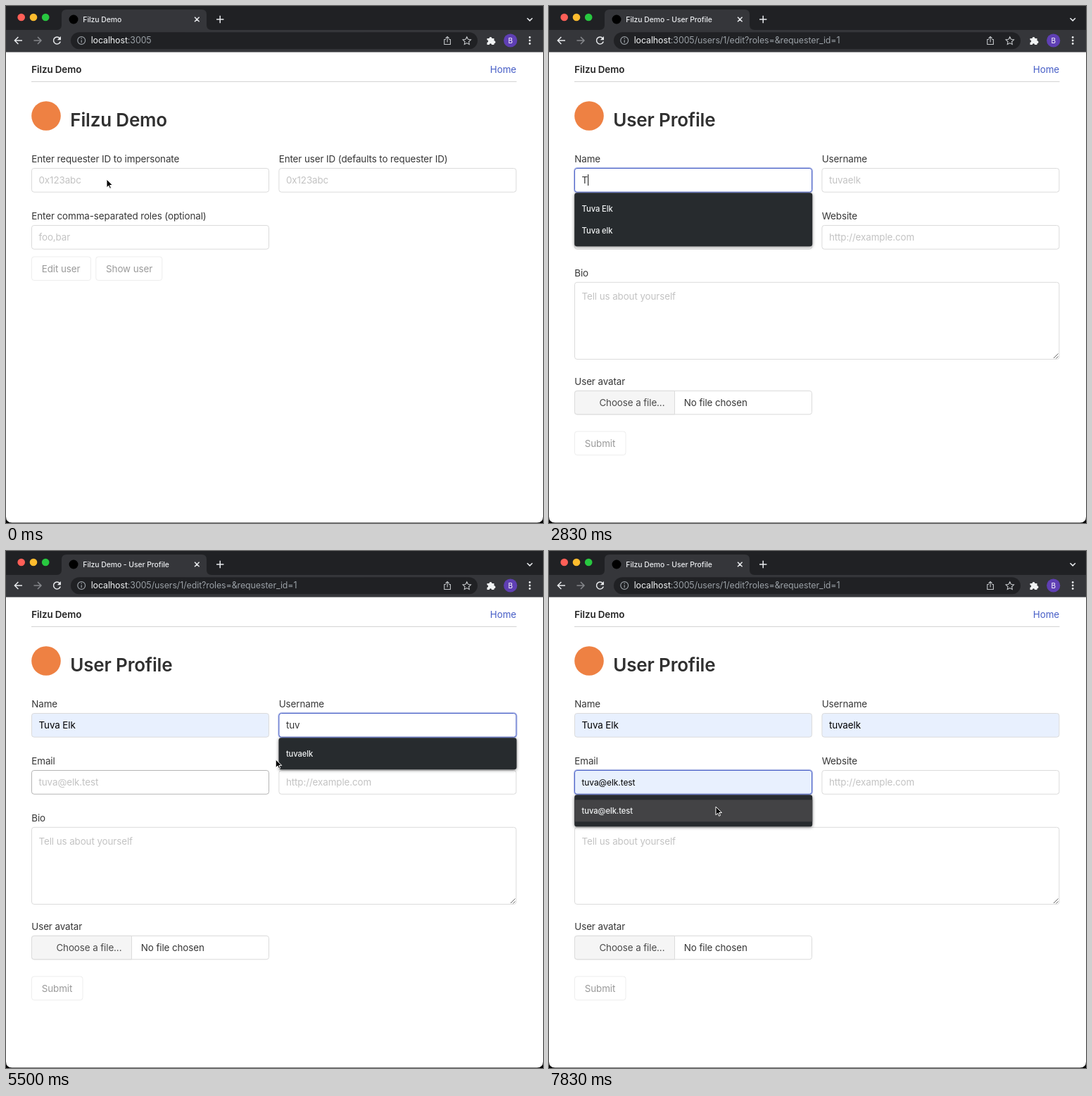
An HTML page for the animation above (8 s loop, 763 by 734 pixels).

```html
<!DOCTYPE html>
<html lang="en">
<head>
<meta charset="utf-8">
<title>Filzu Demo</title>
<style>
  html, body { margin: 0; width: 100%; height: 100%; overflow: hidden; background: #000; }
  svg { display: block; }
  text { font-family: Inter, Roboto, sans-serif; letter-spacing: -.007em; white-space: pre; }
  .popup { filter: drop-shadow(0 1px 2px rgba(0, 0, 0, .5)); }
</style>
</head>
<body>
<svg id="stage" width="763" height="734" viewBox="0 0 763 734"></svg>
<script>
const LOOP = 8000, SIZE = 13.4;
const INK = '#363636', LINK = '#485fc7', TEAL = '#00d1b2', LINE = '#dbdbdb', HOVER = '#b5b5b5';
const NAME = 'Tuva Elk', USER = 'tuvaelk', MAIL = 'tuva@elk.test';
const OPEN_PAGE = 1610, TYPED = 0, FILLED = 1, PREVIEW = 2;

// Each timeline holds [start, value, ...] entries; the latest started one applies.
const focus = [[0, ''], [120, 'id'], [1100, 'edit'], [OPEN_PAGE, ''], [2060, 'name'], [4170, 'user'], [6060, 'email']];
const typing = (start, gap, word) => [...word].map((_, i) => [start + i * gap, word.slice(0, i + 1), TYPED]);
const values = {
  id: [[0, ''], [400, '1', TYPED]],
  name: [[0, ''], ...typing(2780, 170, 'Tuv'), [3390, NAME, PREVIEW], [3940, NAME, FILLED]],
  user: [[0, ''], ...typing(4670, 160, 'tuv'), [5560, USER, PREVIEW], [5830, USER, FILLED]],
  email: [[0, ''], ...typing(7000, 85, 'tuv'), [7745, MAIL, PREVIEW]]
};
const popups = [
  [0, null],
  [2780, [NAME, 'Tuva elk']], [3940, null],
  [4670, [USER]], [5830, null],
  [6890, ['asd', 'brolkasundet@mail.test', MAIL, 'ads', 'dsa', 'is']], [7000, [MAIL]]
];
const pointer = [
  [0, 143, 246, 'arrow'], [60, 143, 246, 'beam'], [120, 144, 248, 'beam'], [400, 144, 248, ''],
  [610, 142, 256, 'beam'], [650, 138, 275, 'arrow'], [690, 130, 315, 'beam'], [735, 119, 347, 'arrow'],
  [780, 114.5, 358, 'hand'], [830, 114.5, 358, 'hand'], [960, 104, 366, 'hand'], [OPEN_PAGE, 104, 366, 'hand'],
  [1660, 106, 362, 'arrow'], [1960, 157, 256, 'beam'], [2060, 160, 249, 'beam'], [2780, 160, 249, ''],
  [3330, 160, 252, 'beam'], [3390, 160, 268, 'arrow'], [3560, 159, 282, 'hand'], [3720, 159, 285.5, 'hand'], [4170, 159, 285.5, ''],
  [5050, 161, 288, 'arrow'], [5440, 383, 296, 'arrow'], [5500, 383, 296, 'arrow'], [5560, 396, 293, 'arrow'],
  [5670, 430, 284, 'hand'], [6060, 430, 284, ''],
  [7500, 229, 332, 'beam'], [7670, 229, 332, 'beam'], [7720, 231, 342, 'arrow'], [7830, 237, 363, 'arrow']
];
const shapes = {
  arrow: '<path d="M0 0v11.8l2.8-2.6 1.8 4.1 1.9-.9-1.8-3.9h3.8z" fill="#000" stroke="#fff"/>',
  hand: '<path d="M-1 1c0-1.3 2-1.3 2 0v4c.3-.9 1.9-.8 2 .2c.4-.7 1.8-.5 1.9 .5c.5-.6 1.7-.2 1.7 .8v3.5c0 2-1 2.6-1.2 4.5h-5.4c-.4-1.8-2.6-3.2-3.6-5.2c-.5-1.2 1-2 2-.9l.6 .8zM1.200 9.500v3M3 9.500v3M4.800 9.500v3" fill="#fff" stroke="#000"/>',
  beam: '<path d="M-3-7q3 0 3 2q0-2 3-2M0-5V5M-3 7q3 0 3-2q0 2 3 2" fill="none" stroke="#222"/>'
};

const at = (list, t) => list.findLast(e => e[0] <= t);
const pen = document.createElement('canvas').getContext('2d');
function widthOf(s) {
  pen.font = `${SIZE}px Inter, Roboto, sans-serif`;
  return pen.measureText(s).width;
}

const text = (x, y, s, fill = INK, size = SIZE, weight = 400, more = '') =>
  `<text x="${x}" y="${y}" fill="${fill}" font-size="${size}" font-weight="${weight}" ${more}>${s}</text>`;
const box = (x, y, w, h, fill, stroke = 'none', r = 3.4) =>
  `<rect x="${x}" y="${y}" width="${w}" height="${h}" rx="${r}" fill="${fill}" stroke="${stroke}"/>`;
const ring = (x, y, w, h, color) =>
  `<rect x="${x}" y="${y}" width="${w}" height="${h}" rx="4" fill="none" stroke="${color}" stroke-opacity=".35" stroke-width="3"/>`;
const dot = (x, y, r, fill) => `<circle cx="${x}" cy="${y}" r="${r}" fill="${fill}"/>`;
const line = (d, stroke = '#e8eaed', w = 1.5) => `<path d="${d}" fill="none" stroke="${stroke}" stroke-width="${w}"/>`;

function button(x, y, w, label, on, focused) {
  const body = on ? box(x, y, w, 34.5, TEAL) : box(x + .5, y + .5, w - 1, 33.5, '#fff', '#ededed');
  return (focused ? ring(x, y, w, 34.5, TEAL) : '') + body
    + text(x + 14.8, y + 22.4, label, on ? '#fff' : '#9a9a9a');
}

function field(t, x, y, label, hint, id, hover) {
  const [since, focused] = at(focus, t);
  const active = id && focused === id;
  const [changed, value, mode] = id ? at(values[id], t) : [0, ''];
  let s = text(x + .3, y - 8, label);
  if (active) s += ring(x + .3, y + .3, 337.4, 34.1, LINK);
  s += box(x + .5, y + .5, 337, 33.7, mode ? '#e8f0fe' : '#fff', active ? LINK : hover ? HOVER : LINE);
  if (value) s += text(x + 10.5, y + 22, value, mode ? '#000' : INK, mode === PREVIEW ? 12 : SIZE);
  else s += text(x + 10.5, y + 22, hint, '#c3c3c3');
  const blinkOn = (t - Math.max(since, changed)) % 1000 < 500;
  if (active && mode !== PREVIEW && blinkOn)
    s += box(x + 10.5 + widthOf(value), y + 9, 1, 16, '#111', 'none', 0);
  return s;
}

function popup(t) {
  const items = at(popups, t)[1];
  if (!items) return '';
  const id = at(focus, t)[1];
  const x = id === 'user' ? 387.5 : 36.2, y = id === 'email' ? 346.3 : 265.2;
  let s = box(x, y, 338, 14 + items.length * 31, '#272b2e');
  if (at(values[id], t)[2] === PREVIEW) s += box(x, y + 7, 338, 31, '#434345', 'none', 0);
  items.forEach((item, i) => s += text(x + 10.4, y + 26.3 + i * 31, item, '#f1f3f4', 11.2, 500));
  return `<g class="popup">${s}</g>`;
}

function browser(t) {
  const edit = t >= OPEN_PAGE;
  const rest = ':3005' + (edit ? '/users/1/edit?roles=&amp;requester_id=1' : '');
  return box(0, 0, 763, 80, '#202124', 'none', 0)
    + box(0, 34, 763, 31.5, '#35363a', 'none', 0)
    + dot(21.7, 16, 5.3, '#ff5f57') + dot(39, 16, 5.3, '#febc2e') + dot(56.2, 16, 5.3, '#28c840')
    + '<path d="M72 34q7 0 7-7V12q0-7 7-7H278q7 0 7 7V27q0 7 7 7z" fill="#35363a"/>'
    + dot(96, 19, 6.5, '#000')
    + text(109.3, 22.8, 'Filzu Demo' + (edit ? ' - User Profile' : ''), '#e8eaed', 10.45, 500)
    + line('M268 15.7l6.6 6.6m0-6.6l-6.6 6.6M299 19h10.4M304.2 13.8v10.4M740.5 17.2l3.7 3.7 3.7-3.7')
    + line('M23 49H12.5M17.4 44l-5 5 5 5')
    + line('M39.5 49H50M45 44l5 5-5 5', '#85878b')
    + line('M76.4 45.8A5 5 0 1 0 77.3 50.5')
    + '<path d="M78 43v5.2h-5.2z" fill="#e8eaed"/>'
    + box(92, 37.3, 578, 24, '#202124', 'none', 12)
    + line('M101.8 49a5.4 5.4 0 1 0 10.8 0a5.4 5.4 0 1 0-10.8 0M107.2 48.3v3.7M107.2 45.6v1.4', '#9aa0a6', 1.2)
    + text(120.7, 53.3, `localhost<tspan fill="#9aa0a6">${rest}</tspan>`, '#f1f3f4', 12.4)
    + line('M625 47.5h-2.2v7h8.6v-7h-2.2M627.1 51.5V43.7M624.6 46l2.5-2.4 2.5 2.4', '#c4c7ca', 1.1)
    + line('M654.8 43.7l1.7 3.6 4 .5-2.9 2.7 .7 4-3.5-1.9-3.5 1.9 .7-4-2.9-2.7 4-.5z', '#c4c7ca', 1.1)
    + '<path d="M683.5 46h3a2 2 0 1 1 4 0h3v3.2a2 2 0 1 1 0 4V55h-3.4a1.7 1.7 0 1 0-3.4 0h-3.2v-3.3a1.7 1.7 0 1 0 0-3.4z" fill="#f1f3f4"/>'
    + dot(716.7, 49, 9.6, '#5f3fb4') + text(716.7, 52.7, 'B', '#fff', 10, 400, 'text-anchor="middle"')
    + [44.5, 49, 53.5].map(y => dot(744.2, y, 1.4, '#e8eaed')).join('');
}

function homePage(t) {
  const ready = at(values.id, t)[1] !== '';
  return field(t, 36, 230, 'Enter requester ID to impersonate', '0x123abc', 'id')
    + field(t, 387.4, 230, 'Enter user ID (defaults to requester ID)', '0x123abc')
    + field(t, 36, 311, 'Enter comma-separated roles (optional)', 'foo,bar', '', t >= 690)
    + button(36, 355.5, 85, 'Edit user', ready, at(focus, t)[1] === 'edit')
    + button(127.3, 355.5, 95, 'Show user', ready);
}

function profilePage(t) {
  return field(t, 36, 230, 'Name', NAME, 'name')
    + field(t, 387.4, 230, 'Username', USER, 'user')
    + field(t, 36, 311, 'Email', MAIL, 'email', t >= 3940)
    + field(t, 387.4, 311, 'Website', 'http://example.com')
    + text(36.3, 384, 'Bio') + box(36.5, 392.3, 688.4, 109.2, '#fff', LINE)
    + text(46.5, 417.3, 'Tell us about yourself', '#c3c3c3')
    + line('M717 500l6.5-6.5M720.5 500.5l3-3', '#666', 1)
    + text(36.3, 538, 'User avatar') + box(36.5, 546.4, 337, 33.4, '#fff', LINE)
    + '<path d="M178.5 546.4H40q-3.5 0-3.5 3.4v26.6q0 3.4 3.5 3.4H178.5z" fill="#f5f5f5" stroke="#dbdbdb"/>'
    + text(71.4, 568, 'Choose a file...', '#4a4a4a') + text(191.8, 568, 'No file chosen')
    + button(36, 603.5, 73.5, 'Submit', false);
}

function cursor(t) {
  const i = pointer.indexOf(at(pointer, t));
  const [t0, x, y, kind] = pointer[i];
  if (!kind) return '';
  const [t1, nx, ny] = pointer[i + 1] || [LOOP, x, y];
  const k = (t - t0) / (t1 - t0);
  return `<g transform="translate(${(x + (nx - x) * k).toFixed(1)} ${(y + (ny - y) * k).toFixed(1)})">${shapes[kind]}</g>`;
}

function scene(t) {
  const edit = t >= OPEN_PAGE;
  return browser(t)
    + '<path d="M0 65.5H763V725q0 8.5-8.5 8.5H8.5Q0 733.5 0 725z" fill="#fff"/>'
    + text(36.3, 95, 'Filzu Demo', '#222', SIZE, 600)
    + text(725, 95, 'Home', LINK, SIZE, 400, 'text-anchor="end"')
    + line('M36 107.3H725.5', '#cfcfcf', 1)
    + dot(57, 156, 20.8, '#ee8143')
    + text(91.3, 171, edit ? 'User Profile' : 'Filzu Demo', '#303030', 26, 600)
    + (edit ? profilePage(t) : homePage(t))
    + popup(t) + cursor(t);
}

const stage = document.getElementById('stage');
let shown = '';
function frame(now) {
  const next = scene(now % LOOP);
  if (next !== shown) stage.innerHTML = shown = next;
  requestAnimationFrame(frame);
}
frame(0);
</script>
</body>
</html>
```
